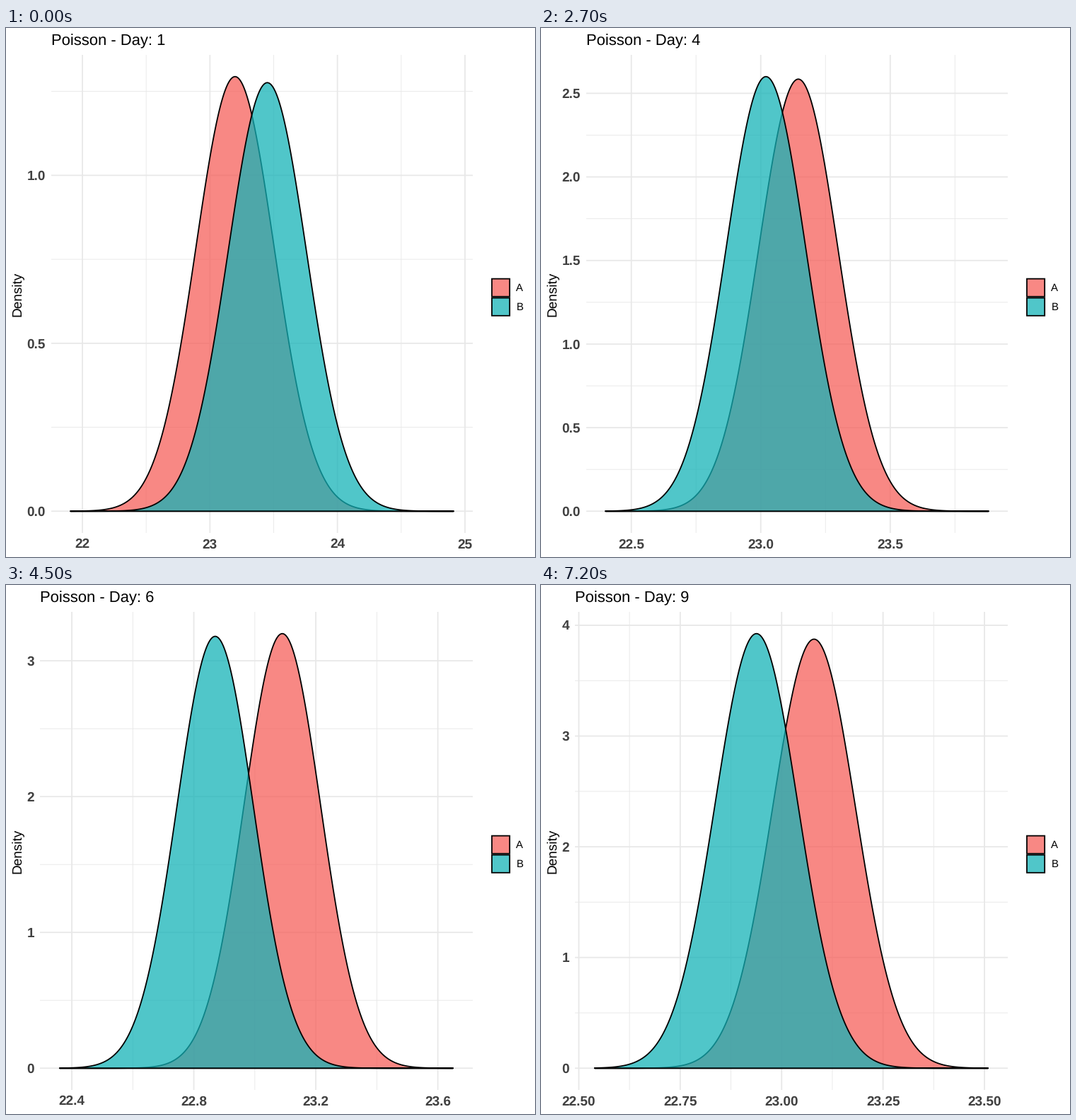
These frames come from a looping animation (748 by 748 pixels, 8000 ms). A matplotlib script:

```python
from collections import namedtuple

import numpy as np
import matplotlib.pyplot as plt
from matplotlib.animation import FuncAnimation
from matplotlib.patches import Polygon, Rectangle

SIZE = 748
TOP, BOTTOM, RIGHT = 38, 714, 660
EXPAND = 0.05 / 1.1          # share of the panel left free at each end
RED, TEAL, ALPHA = (0.963, 0.369, 0.349), (0.073, 0.698, 0.719), 0.74
GRID, TICK = "#e8e8e8", "#404040"
LINE = 1.8
SPREAD = 0.307               # standard deviation after one day

# Data range, then centre and peak of each group's density; ticks pass tick
Day = namedtuple("Day", "low high mean_a peak_a mean_b peak_b tick",
                 defaults=[23])
DAYS = [
    Day(21.906, 24.911, 23.197, 1.294, 23.450, 1.276),
    Day(22.200, 24.280, 23.160, 1.830, 23.270, 1.815),
    Day(22.316, 23.942, 23.166, 2.262, 23.131, 2.250),
    Day(22.400, 23.880, 23.145, 2.585, 23.020, 2.600),
    Day(22.358, 23.734, 23.134, 2.918, 22.943, 2.912),
    Day(22.360, 23.650, 23.090, 3.200, 22.870, 3.180, 22.8),
    Day(22.355, 23.562, 23.070, 3.477, 22.844, 3.400, 22.8),
    Day(22.453, 23.514, 23.066, 3.723, 22.941, 3.693),
    Day(22.539, 23.509, 23.080, 3.875, 22.938, 3.925),
]

plt.rcParams.update({"font.family": "Liberation Sans",
                     "text.hinting": "none", "text.hinting_factor": 1})
fig = plt.figure(figsize=(7.48, 7.48), dpi=100, facecolor="white")
ax = fig.add_axes([0, 0, 1, 1])


def pt(px):
    return px * 0.72


def text(x, y, label, size, **style):
    ax.text(x, y, label, fontsize=pt(size), va="baseline", **style)


def scale(low, high, start, end):
    """Map low..high into start..end, keeping the free share at both ends."""
    pad = (end - start) * EXPAND
    return lambda v: (start + pad
                      + (v - low) / (high - low) * (end - start - 2 * pad))


def tick_step(span, choices):
    """Largest step that still fits about three times into the span."""
    return max((c for c in choices if c <= span / 2.9), default=choices[0])


def ticks(anchor, step, to_px, start, end):
    """Yield value, pixel and whether the line is major, every half step."""
    for k in range(-10, 11):
        value = anchor + k * step / 2
        if start <= to_px(value) <= end:
            yield value, to_px(value), k % 2 == 0


def decimals(step):
    return len(f"{step:g}".partition(".")[2])


def grid_line(xs, ys, major):
    ax.plot(xs, ys, color=GRID, lw=pt(LINE if major else LINE / 2),
            solid_capstyle="butt", snap=False, zorder=1.5 if major else 1)


def draw_axes(day, left, to_x, to_y, y_step):
    x_step = tick_step(day.high - day.low, (0.25, 0.4, 0.5, 1))
    style = dict(weight="bold", color=TICK)
    for value, x, major in ticks(day.tick, x_step, to_x, left, RIGHT):
        grid_line([x, x], [TOP, BOTTOM], major)
        if major:
            text(x, 735.4, f"{value:.{decimals(x_step)}f}", 18.7,
                 ha="center", **style)
    for value, y, major in ticks(0, y_step, to_y, TOP, 690):
        grid_line([left, RIGHT], [y, y], major)
        if major:
            text(left - 8, y + 6.5, f"{value:.{decimals(y_step)}f}", 18.7,
                 ha="right", **style)


def draw_density(day, mean, peak, sd, color, to_x, to_y, order):
    x = np.linspace(day.low, day.high, 400)
    y = peak * np.exp(-((x - mean) / sd) ** 2 / 2)
    x = np.concatenate([[day.low], x, [day.high]])
    y = np.concatenate([[0], y, [0]])
    ax.add_patch(Polygon(np.column_stack([to_x(x), to_y(y)]),
                         facecolor=(*color, ALPHA), edgecolor="black",
                         lw=pt(LINE), joinstyle="round", zorder=order))


def draw_legend():
    for label, color, y in (("A", RED, 354.6), ("B", TEAL, 381.6)):
        ax.add_patch(Rectangle((687, y), 25.2, 25.2, snap=False,
                               facecolor=(*color, ALPHA),
                               edgecolor="black", lw=pt(LINE)))
        text(721.3, y + 17.8, label, 15)


def draw(frame):
    number = frame // 9 + 1
    day = DAYS[number - 1]
    top = max(day.peak_a, day.peak_b)
    y_step = tick_step(top, (0.5, 1))
    left = 64 if decimals(y_step) else 48
    to_x = scale(day.low, day.high, left, RIGHT)
    to_y = scale(0, top, BOTTOM, TOP)
    sd = SPREAD / number ** 0.5

    ax.clear()
    ax.set(xlim=(0, SIZE), ylim=(SIZE, 0))
    ax.axis("off")
    draw_axes(day, left, to_x, to_y, y_step)
    draw_density(day, day.mean_a, day.peak_a, sd, RED, to_x, to_y, 3)
    draw_density(day, day.mean_b, day.peak_b, sd, TEAL, to_x, to_y, 4)
    draw_legend()
    text(left, 24.2, f"Poisson - Day: {number}", 22.4)
    text(21.8, 376, "Density", 18.9, ha="center", rotation=90,
         rotation_mode="anchor")
    return []


# Nine days of nine frames each; the last is cut one frame short
anim = FuncAnimation(fig, draw, frames=80, interval=100, init_func=lambda: [],
                     repeat=True, repeat_delay=0)
plt.show()
```
